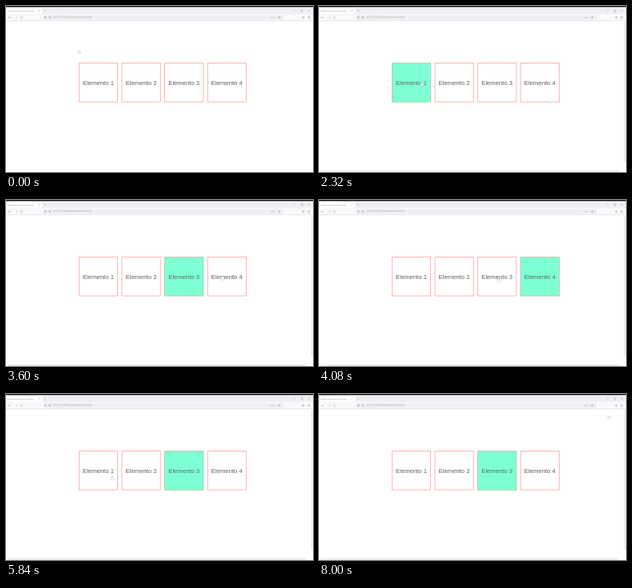
These frames come from a looping animation (384x208 px, 8.08 s). An HTML page with a canvas:

```html
<!DOCTYPE html>
<html lang="pt">
<head>
<meta charset="utf-8">
<title>Elementos</title>
<style>
html, body { margin: 0; width: 100%; height: 100%; overflow: hidden; background: #fff; }
canvas { display: block; width: 384px; height: 208px; }
</style>
</head>
<body>
<canvas id="stage" width="384" height="208"></canvas>
<script>
const ctx = document.getElementById('stage').getContext('2d');
const LOOP = 8080;
const FIRST_CLICK = 2200, BEAT = 480, HOP = 160, LEAD = 200;
const BOX = { x: 91, y: 71.5, size: 49, step: 53.6 };
const SANS = '"Liberation Sans", Arial, sans-serif';
const INK = '#a2a2a8';

// One click per beat: whole part is the box, fraction the place across it.
const aims = [1.69, 2.5, 2.999 + 0.4, 4.35, 3.5, 2.62, 3.4, 3.4, 1.78, 2.45, 3.3];

const clamp = v => Math.max(0, Math.min(1, v));
const mix = (a, b, k) => a + (b - a) * k;
const clickTime = i => FIRST_CLICK + i * BEAT;
const boxX = n => BOX.x + (n - 1) * BOX.step;

const stops = [
  { at: 0, travel: 1, x: 91, y: 56 },
  { at: 1280, travel: 800, x: 146, y: 37 },
  ...aims.map((aim, i) => ({
    at: clickTime(i) - LEAD,
    travel: i ? HOP : 640,
    x: boxX(aim),
    y: mix(95, 103, clamp((clickTime(i) - 3600) / 1600))
  })),
  { at: 7920, travel: 800, x: 362, y: 27 }
];

function pointerAt(t) {
  let { x, y } = stops[0];
  for (const s of stops) {
    const k = 1 - (1 - clamp((t - s.at + s.travel) / s.travel)) ** 2;
    x = mix(x, s.x, k);
    y = mix(y, s.y, k);
  }
  return { x, y };
}

function selectedAt(t) {
  const i = Math.floor((t - FIRST_CLICK) / BEAT);
  return i < 0 ? 0 : Math.floor(aims[Math.min(i, aims.length - 1)]);
}

function rect(x, y, w, h, color) {
  ctx.fillStyle = color;
  ctx.fillRect(x, y, w, h);
}

function frameRect(x, y, w, h, color = INK, width = 0.5) {
  ctx.strokeStyle = color;
  ctx.lineWidth = width;
  ctx.strokeRect(x, y, w, h);
}

function text(str, x, y, size, color, align = 'left') {
  ctx.font = size + 'px ' + SANS;
  ctx.textAlign = align;
  ctx.fillStyle = color;
  ctx.fillText(str, x, y);
}

function line(x1, y1, x2, y2, color = INK) {
  ctx.beginPath();
  ctx.moveTo(x1, y1);
  ctx.lineTo(x2, y2);
  ctx.strokeStyle = color;
  ctx.lineWidth = 0.5;
  ctx.stroke();
}

function cross(x, y, r) {
  line(x - r, y - r, x + r, y + r);
  line(x - r, y + r, x + r, y - r);
}

function backOrForward(x, dir, color) {
  line(x - 1.5, 14.5, x + 1.5, 14.5, color);
  for (const dy of [-1.2, 1.2]) line(x + dir * 1.5, 14.5, x + dir * 0.3, 14.5 + dy, color);
}

function drawTabs() {
  rect(0, 1, 384, 9.5, '#f0f0f4');
  rect(0, 0, 384, 1.3, '#0c0c0d');
  rect(1, 2.5, 44, 7.5, '#fff');
  text('Seleção de classe com jquery', 2, 7.2, 2.5, '#777');
  cross(41.3, 5.9, 0.8);
  line(48, 5.9, 50, 5.9);
  line(49, 4.9, 49, 6.9);
  line(360, 6, 362, 6);
  frameRect(369, 5, 2, 2);
  cross(379, 6, 0.9);
}

function drawToolbar() {
  rect(0, 10.5, 384, 8, '#f9f9fb');
  rect(0, 18.3, 384, 0.6, '#dedee2');
  rect(47, 11.5, 300, 6, '#f0f0f4');
  backOrForward(4.5, -1, INK);
  backOrForward(12.5, 1, '#cfcfd3');
  ctx.strokeStyle = INK;
  ctx.beginPath();
  ctx.arc(19.5, 14.5, 1.3, 0.3, 5.6);
  ctx.stroke();
  for (const x of [48.2, 53.8, 340.8, 370.8]) frameRect(x, 13.4, 2, 2.2);
  text('127.0.0.1:5500/aula/elementos/index.html', 59, 15.4, 2.6, '#aaa');
  text('150%', 334, 15.4, 2.4, '#777', 'center');
  for (let i = 0; i < 3; i++) line(377.5, 13.4 + i * 1.1, 380, 13.4 + i * 1.1);
}

function drawBoxes(t) {
  const active = selectedAt(t);
  for (let n = 1; n <= 4; n++) {
    const x = boxX(n), on = n === active;
    if (on) rect(x, BOX.y, BOX.size, BOX.size, '#7fffd4');
    frameRect(x + 0.4, BOX.y + 0.1, BOX.size - 0.8, BOX.size - 0.5,
      on ? '#c2bea2' : '#ffa3a3', 0.8);
    text('Elemento ' + n, x + BOX.size / 2, 98.7, 7.7, on ? '#4f6f64' : '#5c5c5c', 'center');
  }
}

function overBox({ x, y }) {
  const dx = x - BOX.x;
  return y >= BOX.y && y <= BOX.y + BOX.size && dx >= 0 &&
    dx < 4 * BOX.step && dx % BOX.step <= BOX.size;
}

function drawPointer(t) {
  const p = pointerAt(t);
  ctx.save();
  ctx.translate(p.x, p.y);
  ctx.beginPath();
  if (overBox(p)) {
    ctx.roundRect(-1.6, 1.9, 3.4, 2.9, 1);
    ctx.roundRect(-0.8, 0, 1, 3, 0.5);
  } else {
    ctx.moveTo(0, 0);
    ctx.lineTo(0, 3.7);
    ctx.lineTo(2.6, 2.7);
    ctx.closePath();
  }
  ctx.strokeStyle = '#99999d';
  ctx.lineWidth = 0.7;
  ctx.stroke();
  ctx.fillStyle = '#fff';
  ctx.fill();
  ctx.restore();
}

const start = performance.now();
function frame() {
  const t = (performance.now() - start) % LOOP;
  rect(0, 0, 384, 208, '#fff');
  drawTabs();
  drawToolbar();
  if (t >= 400) {
    rect(2, 206.5, 373, 0.8, '#cfcfd1');
    rect(382.4, 20, 0.8, 175, '#cfcfd1');
  }
  drawBoxes(t);
  drawPointer(t);
  requestAnimationFrame(frame);
}
frame();
</script>
</body>
</html>
```
